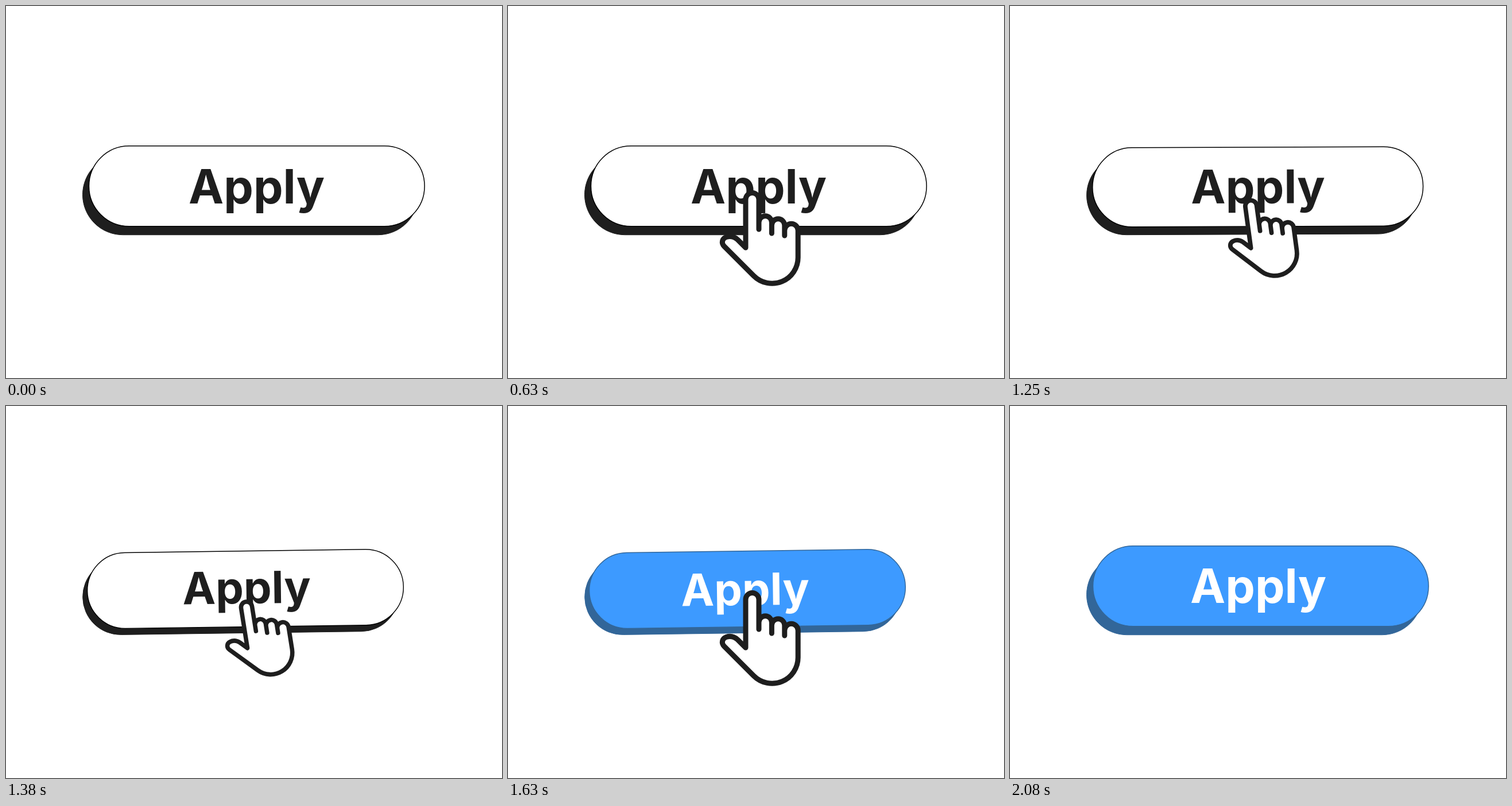
Write an HTML page with a canvas that moves like this. It is 864 px wide and 648 px high and loops after 4000 ms.

```html
<!DOCTYPE html>
<html lang="en">
<head>
<meta charset="utf-8">
<title>Apply button</title>
<style>
  html, body { margin: 0; width: 100%; height: 100%; overflow: hidden; background: #fff; }
  canvas { display: block; width: 864px; height: 648px; }
</style>
</head>
<body>
<canvas id="stage" width="864" height="648"></canvas>
<script>
const ctx = document.getElementById('stage').getContext('2d');
const LOOP = 4000;
const INK = '#1e1e1e';
const LIGHT = {
  face: '#fff', side: INK, edge: '#000', label: INK,
  rest: [436.5, 343.5], pressed: [419.5, 344]
};
const BLUE = {
  face: '#3d9aff', side: '#326699', edge: '#326699', label: '#fff',
  rest: [432.5, 343], pressed: [413.5, 347]
};
const HAND_CENTER = [440, 405];

const mix = (a, b, p) => a + (b - a) * p;
const clamp = v => Math.min(1, Math.max(0, v));
const smooth = v => v * v * (3 - 2 * v);
const ramp = (v, from, to) => smooth(clamp((v - from) / (to - from)));

// The motion runs at 24 steps per second, with starts rounded to 10 ms.
const stepAt = ms => Math.ceil(0.24 * (Math.floor(ms / 10) + 0.5)) - 1;

function placed(x, y, degrees, scale, draw) {
  ctx.save();
  ctx.translate(x, y);
  ctx.rotate(degrees * Math.PI / 180);
  ctx.scale(scale, scale);
  draw();
  ctx.restore();
}

function pill() {
  ctx.beginPath();
  ctx.roundRect(-292.3, -70, 584.6, 140, 70);
}

function drawButton(press, theme) {
  const x = mix(436.8, 417, press);
  const y = mix(313.7, 318.6, press);
  const angle = -0.78 * press;
  const scale = mix(1, 0.942, press);

  placed(x - mix(11, 8, press), y + mix(15, 11, press), angle, scale, () => {
    pill();
    ctx.fillStyle = ctx.strokeStyle = theme.side;
    ctx.lineWidth = 1;
    ctx.fill();
    ctx.stroke();
  });
  placed(x, y, angle, scale, () => {
    pill();
    ctx.fillStyle = theme.face;
    ctx.strokeStyle = theme.edge;
    ctx.lineWidth = 1.5;
    ctx.fill();
    ctx.stroke();
  });

  const [labelX, labelY] = theme.rest.map((v, i) => mix(v, theme.pressed[i], press));
  placed(labelX, labelY, angle, scale, () => {
    ctx.font = '700 82px Inter, sans-serif';
    ctx.textAlign = 'center';
    ctx.fillStyle = theme.label;
    ctx.fillText('Apply', 0, 0);
  });
}

const hand = new Path2D(`
  M414 421 V337 A11.5 11.5 0 0 1 437 337 V389 V377
  A11.2 11.2 0 0 1 459.4 377 V396 V382
  A11.2 11.2 0 0 1 481.8 382 V400 V391
  A11.7 11.7 0 0 1 505.2 391 V438
  A45.2 45.2 0 0 1 428 470 L376.5 418.5
  C371 413 373 405 380 402.5 C388 399.8 395 402.5 400 407 Z`);

function drawHand(dy, angle, scale) {
  const [cx, cy] = HAND_CENTER;
  placed(cx, cy + dy, angle, scale, () => {
    ctx.translate(-cx, -cy);
    ctx.lineWidth = 9;
    ctx.lineJoin = ctx.lineCap = 'round';
    ctx.fillStyle = '#fff';
    ctx.strokeStyle = INK;
    ctx.fill(hand);
    ctx.stroke(hand);
  });
}

function render(ms) {
  const step = stepAt(ms);
  ctx.fillStyle = '#fff';
  ctx.fillRect(0, 0, 864, 648);

  const press = ramp(step, 29, 32) - ramp(step, 39, 42);
  drawButton(press, step < 39 ? LIGHT : BLUE);

  if (step >= 9 && step < 50) {
    const away = Math.max(0, (15 - step) / 6, (step - 44) / 5) ** 2;
    const tap = (1 - Math.cos(2 * Math.PI * clamp((step - 25) / 14))) / 2;
    drawHand(246 * away, -20 * away - 9.5 * tap, 1 - 0.17 * tap);
  }
}

const start = performance.now();
function tick() {
  render((performance.now() - start) % LOOP);
  requestAnimationFrame(tick);
}
tick();
</script>
</body>
</html>
```
